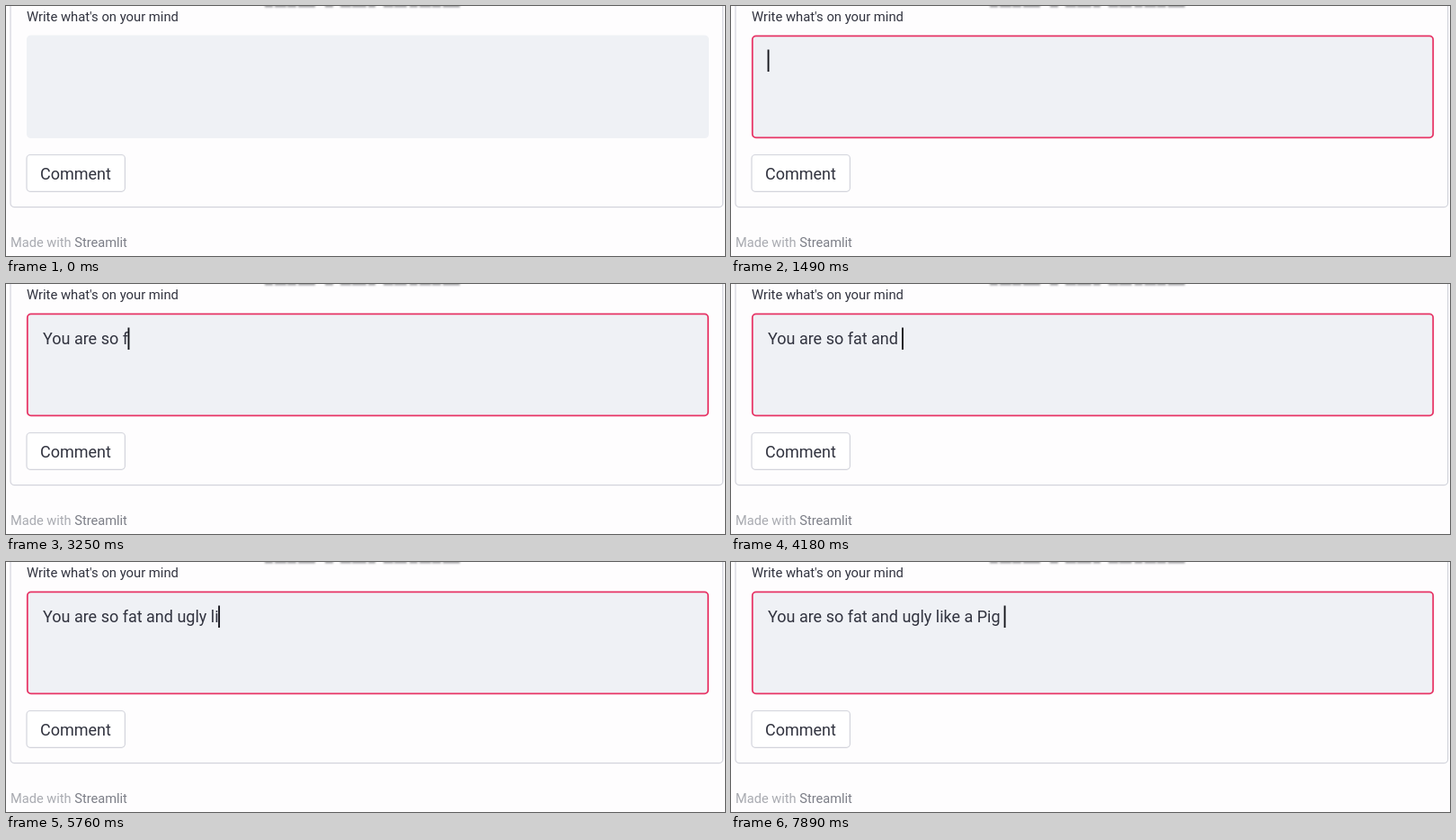
An HTML page for the animation above (8000 ms loop, 800x278 px).

```html
<!DOCTYPE html>
<html lang="en">
<head>
<meta charset="utf-8">
<title>Comment form</title>
<style>
  html, body { margin: 0; width: 100%; height: 100%; overflow: hidden; background: #fefdfe; }
  svg { display: block; width: 800px; height: 278px; }
  text { font-family: Roboto, "Open Sans", sans-serif; fill: #31333f; white-space: pre; }
  .label { font-size: 14.8px; }
  .body { font-size: 18px; }
  .foot { font-size: 14.6px; fill: #a9abb1; }
  .foot tspan { fill: #7c7e87; }
  .line { fill: none; stroke: #d3d4dc; stroke-width: 1.2; }
</style>
</head>
<body>
<svg viewBox="0 0 800 278">
  <defs>
    <filter id="soft" x="-5%" y="-10" width="110%" height="20" filterUnits="userSpaceOnUse">
      <feGaussianBlur stdDeviation="0.9"/>
    </filter>
  </defs>
  <path d="M288 0H510" stroke="#8f8f92" stroke-width="2.4" filter="url(#soft)"
        stroke-dasharray="9 2 13 1 10 2 19 11 9 8 12 1 16 2 8 9 11 1 14 3"/>
  <rect class="line" x="5" y="-40" width="792.6" height="263.6" rx="4"/>
  <text class="label" x="23" y="17">Write what's on your mind</text>
  <rect x="23" y="32.5" width="759" height="114.5" rx="4.5" fill="#eff1f5"/>
  <rect id="focus" x="23.8" y="33.4" width="757.4" height="112.9" rx="4"
        fill="none" stroke="#e83566" stroke-width="1.8"/>
  <text class="body" id="typed" x="41" y="67"></text>
  <rect id="caret" y="48.5" width="1.9" height="24.5" fill="#15161c"/>
  <rect class="line" x="23" y="165.5" width="109.4" height="40.8" rx="4" style="fill:#fff"/>
  <text class="body" x="38" y="192.5">Comment</text>
  <text class="foot" x="5" y="268">Made with <tspan>Streamlit</tspan></text>
</svg>
<script>
  const LOOP = 8000;
  const MESSAGE = "You are so fat and ugly like a Pig ";

  // Times at which each successive character of MESSAGE is typed
  const KEYS = [
    1580, 1760, 1860, 2040,         // You
    2140, 2320, 2410, 2690,         // are
    2880, 2970, 3060,               // so
    3250, 3340, 3530, 3620,         // fat
    3810, 3990, 4080, 4180,         // and
    4640, 4830, 5010, 5290, 5390,   // ugly
    5570, 5760, 5940, 6040, 6130,   // like
    6220, 6410,                     // a
    7060, 7240, 7430, 7890          // Pig
  ];

  // Intervals in which the caret is hidden
  const HIDDEN = [[0, 840], [1110, 1490], [4550, 4640], [6780, 7060], [7800, 7890]];
  const FOCUS = [[0, 0], [840, 0.5], [930, 1]];

  const byId = id => document.getElementById(id);
  const typed = byId("typed"), caret = byId("caret"), focus = byId("focus");
  const pen = document.createElement("canvas").getContext("2d");
  pen.font = '18px Roboto, "Open Sans", sans-serif';

  function draw(t) {
    const text = MESSAGE.slice(0, KEYS.filter(k => k <= t).length);
    if (typed.textContent !== text) typed.textContent = text;
    caret.setAttribute("x", 40.6 + pen.measureText(text).width);
    const hidden = HIDDEN.some(([a, b]) => t >= a && t < b);
    caret.setAttribute("visibility", hidden ? "hidden" : "visible");
    focus.setAttribute("opacity", FOCUS.filter(([a]) => a <= t).pop()[1]);
  }

  const start = performance.now();
  function tick() {
    draw((performance.now() - start) % LOOP);
    requestAnimationFrame(tick);
  }
  tick();
</script>
</body>
</html>
```
